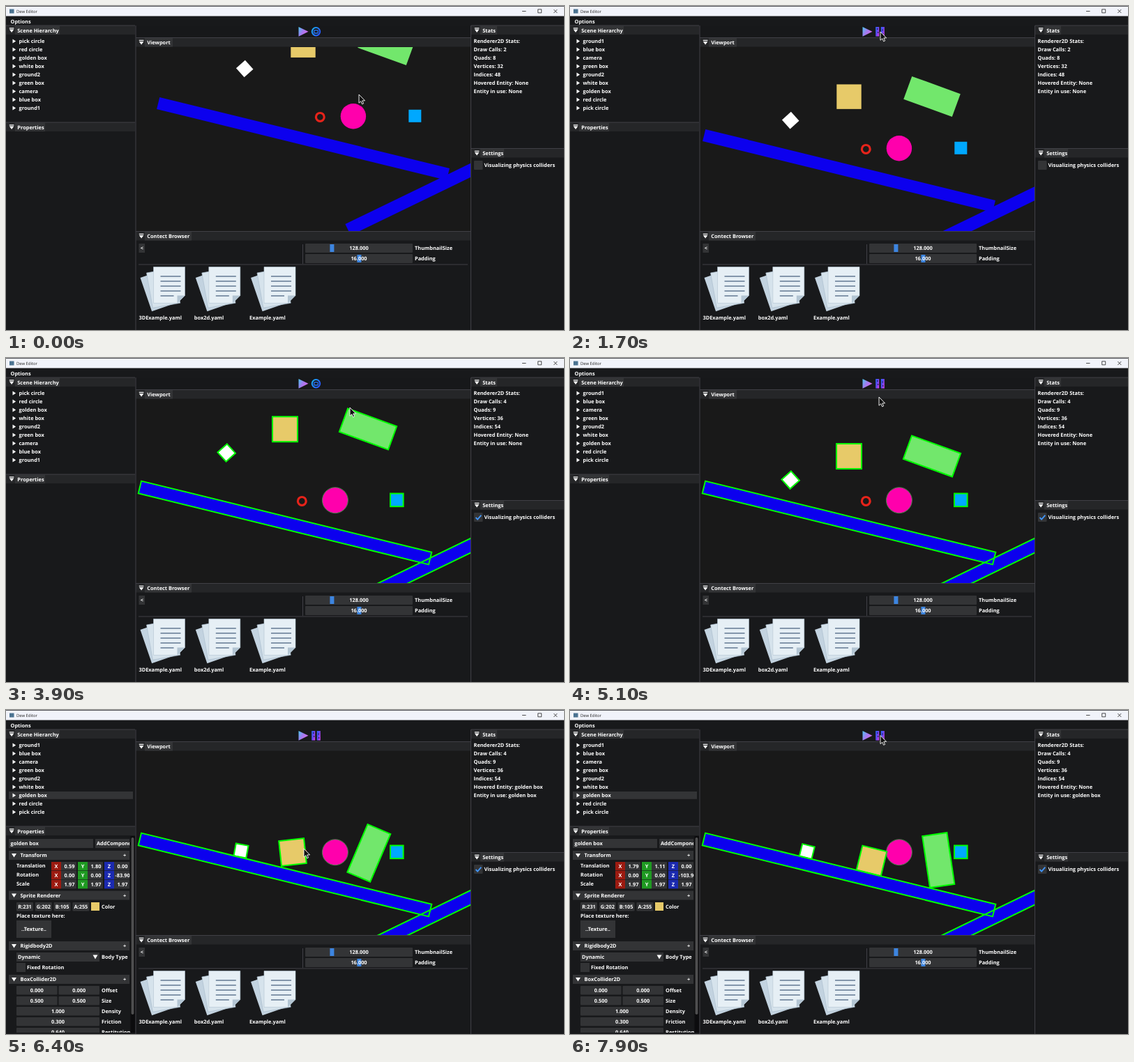
Recreate the animation shown at these times as an HTML page. Size 800 by 465 pixels, loop 8 s.

```html
<!DOCTYPE html>
<html lang="en">
<head>
<meta charset="utf-8">
<title>Scene editor</title>
<style>
  html, body { margin: 0; width: 100%; height: 100%; overflow: hidden; background: #18191b; }
  svg { display: block; width: 800px; height: 465px; }
  text {
    font: bold 7.4px "Open Sans", "Noto Sans", sans-serif;
    fill: #fff; text-rendering: geometricPrecision; white-space: pre;
  }
  .title { font-size: 5.9px; font-weight: 400; fill: #222; }
  .mid { text-anchor: middle; }
  .collider { fill: none; stroke: #0f0; stroke-width: 2; }
  .collider.thin { stroke: #5a9a5a; stroke-width: .8; }
</style>
</head>
<body>
<svg id="stage" viewBox="0 0 800 465" xmlns="http://www.w3.org/2000/svg"></svg>
<script>
const LOOP = 8000, STEP = 100;
const GRAVITY = 176;                 // px per s²
const PLAY = [[1136, 2000], [4435, LOOP]];
const HOVER = [6200, 7000];
const COLLIDERS_ON = 3500, SELECT = 6400;
const FRAME = '#333436', LINE = '#404046', GOLD = '#e7ca69';
const NAMES = ['ground1', 'blue box', 'camera', 'green box', 'ground2',
  'white box', 'golden box', 'red circle', 'pick circle'];

// ---- markup helpers ----
const rect = (x, y, w, h, fill, more = '') =>
  `<rect x="${x}" y="${y}" width="${w}" height="${h}" fill="${fill}" ${more}/>`;
const path = (d, fill, more = '') => `<path d="${d}" fill="${fill}" ${more}/>`;
const stroke = (d, color, width = 1) => path(d, 'none', `stroke="${color}" stroke-width="${width}"`);
// y is the middle of the line of text
const text = (x, y, s, more = '') => `<text x="${x}" y="${y + 2.7}" ${more}>${s}</text>`;
const mid = (x, y, s, more = '') => text(x, y, s, 'class="mid" ' + more);
const box = (x, y, w, s) => rect(x, y, w, 12.6, FRAME, 'rx="1"') + mid(x + w / 2, y + 6.3, s);

function panelHead(x, y, w, label, tabWidth) {
  return rect(x, y, w, 13, '#252628') + rect(x + 13, y + .5, tabWidth, 12.5, FRAME) +
    rect(x, y - .5, w, 1, LINE) +
    path(`M${x + 4.8} ${y + 3.2}h6.6v1.2h-6.6zM${x + 4.8} ${y + 5.4}h6.6l-3.3 4.6z`, '#fff') +
    text(x + 16.3, y + 7, label);
}

function sectionHead(y, label) {
  return rect(4, y, 173, 13, FRAME) + path(`M8 ${y + 4}h7l-3.5 5.6z`, '#fff') +
    text(20.5, y + 6.5, label) + mid(170, y + 6.3, '+');
}

function slider(y, grabX, value, label) {
  return rect(429, y, 154, 13, FRAME, 'rx="1"') + rect(grabX, y + 1, 6, 11, '#3d85e0') +
    mid(506, y + 6.7, value) + text(586, y + 6.7, label);
}

function file(x, label) {
  const lines = [0, 1, 2, 3, 4].map(i => `M10 ${13.5 + i * 7}h${i < 4 ? 29 : 19}`).join('');
  return `<g transform="translate(${x + 20.5} 374.5)">` +
    rect(0, 0, 38, 51, '#c3d3e0', 'transform="translate(-19 15.5) rotate(-19)"') +
    rect(0, 0, 40, 51, '#d6e3ec', 'stroke="#a9bccb" stroke-width=".6" transform="translate(-10 8.5) rotate(-10)"') +
    path('M0 0H45V41L34 52H0Z', '#e6eff5', 'stroke="#b4c5d2" stroke-width=".6"') +
    path('M45 41H34V52Z', '#b3c5d3') + stroke(lines, '#8396ab', 1.8) +
    '</g>' + text(x - .5, 447, label);
}

function vectorRow(key, y, label) {
  const colors = ['#9c1a10', '#1f9a22', '#1b2ab0'];
  return text(15, y + 5, label) + [...'XYZ'].map((axis, i) => {
    const x = 65 + i * 38;
    return rect(x, y, 14, 12.4, colors[i]) + mid(x + 7, y + 6.2, axis) +
      rect(x + 14, y, 22, 12.4, FRAME) +
      `<svg x="${x + 14}" y="${y}" width="22.5" height="12.4">` +
      text(0, 6.2, '', `id="${key}${axis}"`) + '</svg>';
  }).join('');
}

const colorRow = () => ['R:231', 'G:202', 'B:105', 'A:255']
  .map((s, i) => box(15 + i * 26.8, 276, 24, s)).join('') +
  rect(122, 276, 12, 12, GOLD) + text(137, 282, 'Color');

const pair = (y, s, label) => box(15, y, 58.5, s) + box(75.5, y, 58.5, s) + text(137, y + 6.5, label);
const wide = (y, s, label) => box(15, y, 119, s) + text(137, y + 6.5, label);

const properties = () => `<g id="props" clip-path="url(#propClip)">` +
  rect(4, 185, 121, 13, FRAME) + text(6.5, 191.2, 'golden box') +
  rect(128, 185, 49, 13, FRAME) +
  `<svg x="128" y="185" width="49" height="13">${text(2, 6.2, 'AddComponent')}</svg>` +
  sectionHead(202, 'Transform') + vectorRow('pos', 218, 'Translation') +
  vectorRow('rot', 231, 'Rotation') + vectorRow('scale', 244, 'Scale') +
  sectionHead(259.5, 'Sprite Renderer') + colorRow() + text(15, 295.5, 'Place texture here:') +
  rect(15, 302, 50, 25, FRAME) + mid(40, 314.5, '..Texture..') +
  sectionHead(332, 'Rigidbody2D') + rect(15, 348, 119, 13, FRAME) + text(17, 354.3, 'Dynamic') +
  path('M124.5 351.5h7l-3.5 6z', '#fff') + text(137, 354.3, 'Body Type') +
  rect(15, 363, 13, 13, FRAME) + text(30, 369.4, 'Fixed Rotation') +
  sectionHead(380, 'BoxCollider2D') + pair(396, '0.000', 'Offset') + pair(411, '0.500', 'Size') +
  wide(426, '1.000', 'Density') + wide(441, '0.300', 'Friction') + wide(456, '0.640', 'Restitution') +
  rect(178.5, 181, 6.5, 284, '#0c0c0e') + rect(179.6, 183, 3.8, 254, '#4f4f50', 'rx="1.8"') + '</g>';

// ---- scene bodies: size, colour and resting pose ----
const bodies = {
  ground2: { w: 428, h: 18, fill: '#0c00ee', pose: [656.8, 273.7, -25.9] },
  ground1: { w: 428, h: 17.5, fill: '#0c00ee', pose: [400, 236.5, 13.8] },
  blue: { w: 18, h: 18, fill: '#00a8ff', pose: [560.3, 203.8, 0] },
  green: { w: 74, h: 35, fill: '#72e76c' },
  white: { w: 17.4, h: 17.4, fill: '#fff' },
  red: { r: 5.9, pose: [424.3, 205.4, 0] },
  gold: { w: 35.4, h: 35.4, fill: GOLD },
  pink: { r: 18.2, fill: '#ff00ac', pose: [471.9, 204.2, 0] }
};

// Seconds since play, x, y, degrees; a trailing 1 means sliding instead of flying.
const flights = {
  white: [[0, 316.2, 136, 48], [.8, 316.2, 192.5, 48], [1.25, 328, 198.5, 22], [1.55, 334, 201.5, 8],
    [1.75, 336, 202, 12], [1.965, 337, 202, 10.5, 1], [2.4, 339.8, 203, 14, 1]],
  gold: [[0, 400, 102.2, 0], [1.077, 400, 204.2, 0], [1.965, 411, 204, 83.9], [2.3, 421, 212.5, 96],
    [2.7, 430.5, 215.8, 103.3], [3.3, 432.5, 216.4, 103.9, 1]],
  green: [[0, 519, 102, 20], [1, 519, 190, 20], [1.965, 520.3, 205.3, -67], [3, 528.2, 215.5, -98.4, 1]]
};

const pointer = [[0, 506, 127], [100, 506, 127], [600, 480, 173], [900, 425, 33], [1150, 426, 36],
  [1550, 445, 37], [2050, 445, 37], [3000, 629, 222], [3350, 676, 227], [3600, 676, 228],
  [3900, 493, 71], [4150, 427, 36], [4500, 427, 36], [5000, 443, 56], [5500, 443, 56],
  [6200, 427, 199], [6700, 427, 199], [7600, 445, 36.5]];

const fillMark = (id, b) => {
  if (id === 'red') return `<circle id="${id}" r="${b.r}" fill="none" stroke="#e6231a" stroke-width="3.2"/>`;
  return b.r ? `<circle id="${id}" r="${b.r}" fill="${b.fill}"/>`
    : rect(-b.w / 2, -b.h / 2, b.w, b.h, b.fill, `id="${id}"`);
};
const outlineMark = (id, b) => {
  if (id === 'red') return '';
  return b.r ? `<circle id="${id}Edge" r="${b.r + .3}" class="collider thin"/>`
    : rect(-b.w / 2 - .3, -b.h / 2 - .3, b.w + .6, b.h + .6, 'none', `id="${id}Edge" class="collider"`);
};
const all = fn => Object.entries(bodies).map(([id, b]) => fn(id, b)).join('');

const gradient = (id, ...stops) => `<linearGradient id="${id}" x2="1" y2=".6">` +
  stops.map((c, i) => `<stop offset="${i / (stops.length - 1)}" stop-color="${c}"/>`).join('') +
  '</linearGradient>';

document.getElementById('stage').innerHTML =
  '<defs>' + gradient('playPaint', '#4cc8f0', '#a07cf0', '#d868e8') +
  gradient('ringPaint', '#18b4ff', '#2858ff') + gradient('barPaint', '#2a6cff', '#5a48f0', '#c040e8') +
  '<clipPath id="view">' + rect(187, 59, 479, 264, '#000') + '</clipPath>' +
  '<clipPath id="propClip">' + rect(0, 181, 185, 282, '#000') + '</clipPath></defs>' +
  rect(0, 0, 800, 465, '#18191b') +
  // window frame and menu
  rect(0, .7, 800, 13.8, '#f1f3fa') + rect(5, 4.5, 6.5, 6, '#4b7391') +
  text(15, 7.2, 'Dew Editor', 'class="title"') +
  stroke('M740 7.5h5.5M762.7 4.8h5v5h-5zM785.3 5l5 5m0-5l-5 5', '#222', .8) +
  text(6.5, 22, 'Options') +
  // viewport
  rect(187, 59, 479, 264, '#191919') +
  '<g clip-path="url(#view)"><g id="world">' + all(fillMark) +
  '<g id="edges">' + all(outlineMark) + '</g></g></g>' +
  // panels
  panelHead(0, 28, 185, 'Scene Hierarchy', 64) + panelHead(0, 167, 185, 'Properties', 43) +
  panelHead(186, 45.5, 480, 'Viewport', 40) + panelHead(186, 323.5, 480, 'Contect Browser', 67) +
  panelHead(667, 28, 133, 'Stats', 24) + panelHead(667, 204.5, 133, 'Settings', 34) +
  rect(187, 28, 479, 17, '#17181a') + rect(185.5, 28, 1, 437, LINE) + rect(666, 28, 1, 437, LINE) +
  // toolbar
  path('M419.5 30L433.5 36.8L419.5 43.8Z', 'url(#playPaint)') +
  '<g id="ring"><circle cx="444.5" cy="36.8" r="5.7" fill="none" stroke="url(#ringPaint)" stroke-width="2"/>' +
  rect(441.6, 34.8, 5.8, 4.2, 'none', 'rx="1" stroke="#2a78ff" stroke-width="1.3"') + '</g>' +
  '<g id="bars">' + rect(438.2, 30, 5, 13.6, 'url(#barPaint)') + rect(445.8, 30, 5, 13.6, 'url(#barPaint)') +
  path('M440 32h1.3v2h-1.3zM441 37h1.2v2H441zM447.5 33.5h1.3v2h-1.3zM448 39h1.2v2H448z', '#1b2360') + '</g>' +
  // hierarchy
  rect(4, 117, 178, 10.8, FRAME, 'id="row"') +
  NAMES.map((_, i) => path(`M9.5 ${47.4 + i * 12}l4.6 3l-4.6 3z`, '#fff') +
    text(18.5, 50.5 + i * 12, '', `id="name${i}"`)).join('') +
  // stats and settings
  [0, 1, 2, 3, 4, 5, 6].map(i => text(670.5, 50.5 + i * 12, '', `id="stat${i}"`)).join('') +
  rect(671, 222, 12.5, 13, FRAME, 'rx="1"') + text(685.5, 228.5, 'Visualizing physics colliders') +
  '<g id="check">' + stroke('M673.5 228.8l2.6 2.8l5.2-6', '#4296fa', 1.8) + '</g>' +
  // file browser
  rect(190.5, 341, 8.5, 13, FRAME) + mid(194.8, 347.5, '&lt;') + rect(425, 342, 1, 28, LINE) +
  slider(341, 464.4, '128.000', 'ThumbnailSize') + slider(356, 503.4, '16.000', 'Padding') +
  rect(190, 370.5, 472, 1, LINE) +
  file(191, '3DExample.yaml') + file(270.3, 'box2d.yaml') + file(349.5, 'Example.yaml') +
  properties() +
  path('M0 0V12.2L2.8 9.7L4.6 13.8L6.6 12.9L4.8 8.9H8.6Z', '#111',
    'id="cursor" stroke="#fff" stroke-width=".9" stroke-linejoin="round"');

// ---- motion ----
const $ = id => document.getElementById(id);
const lerp = (a, b, u) => a + (b - a) * u;
const smooth = u => u * u * (3 - 2 * u);
const show = (id, on) => $(id).setAttribute('display', on ? 'inline' : 'none');
const write = (id, s) => { if ($(id).textContent !== s) $(id).textContent = s; };
const within = ([from, to], t) => t >= from && t < to;

function segment(keys, t) {
  let i = 0;
  while (i < keys.length - 2 && t >= keys[i + 1][0]) i++;
  const a = keys[i], b = keys[i + 1];
  return [a, b, Math.min(1, Math.max(0, (t - a[0]) / (b[0] - a[0])))];
}

function flightPose(keys, t) {
  const [a, b, u] = segment(keys, t);
  const arc = b[4] ? 0 : GRAVITY / 2 * (b[0] - a[0]) ** 2 * u * (1 - u);
  return [lerp(a[1], b[1], u), lerp(a[2], b[2], u) - arc, lerp(a[3], b[3], u)];
}

function place(id, [x, y, angle]) {
  const move = `translate(${x} ${y}) rotate(${angle})`;
  $(id).setAttribute('transform', move);
  if (id !== 'red') $(id + 'Edge').setAttribute('transform', move);
}

// Values are centred, but start at the left edge when too wide.
function writeVector(key, values) {
  values.forEach((v, i) => {
    const id = key + 'XYZ'[i];
    write(id, v.toFixed(2));
    $(id).setAttribute('x', Math.max(.8, 12 - $(id).getComputedTextLength() / 2));
  });
}

function draw(t) {
  const run = PLAY.find(span => within(span, t));
  const elapsed = run ? (t - run[0]) / 1000 : 0;
  const colliders = t >= COLLIDERS_ON, selected = t >= SELECT;

  const pan = 1 - smooth(Math.min(1, Math.max(0, (t - 100) / 500)));
  $('world').setAttribute('transform', `translate(${26 * pan} ${-46 * pan})`);
  for (const id in flights) place(id, flightPose(flights[id], elapsed));

  show('edges', colliders);
  show('check', colliders);
  show('ring', !run);
  show('bars', run);
  show('row', selected);
  show('props', selected);

  NAMES.forEach((_, i) => write('name' + i, NAMES[run ? i : NAMES.length - 1 - i]));
  const quads = colliders ? 9 : 8;
  ['Renderer2D Stats:', `Draw Calls: ${colliders ? 4 : 2}`, `Quads: ${quads}`,
    `Vertices: ${quads * 4}`, `Indices: ${quads * 6}`,
    `Hovered Entity: ${within(HOVER, t) ? 'golden box' : 'None'}`,
    `Entity in use: ${selected ? 'golden box' : 'None'}`
  ].forEach((s, i) => write('stat' + i, s));

  const [x, y, angle] = flightPose(flights.gold, elapsed);
  if (selected) {
    writeVector('pos', [.59 + (x - 411) / 17.92, 1.8 - (y - 204) / 17.97, 0]);
    writeVector('rot', [0, 0, -angle]);
    writeVector('scale', [1.97, 1.97, 1.97]);
  }

  const [a, b, u] = segment(pointer, t), e = smooth(u);
  $('cursor').setAttribute('transform', `translate(${lerp(a[1], b[1], e)} ${lerp(a[2], b[2], e)})`);
}

for (const id in bodies) if (bodies[id].pose) place(id, bodies[id].pose);

const start = performance.now();
function tick() {
  const t = (performance.now() - start) % LOOP;
  draw(Math.floor(t / STEP) * STEP);
  requestAnimationFrame(tick);
}
tick();
</script>
</body>
</html>
```
